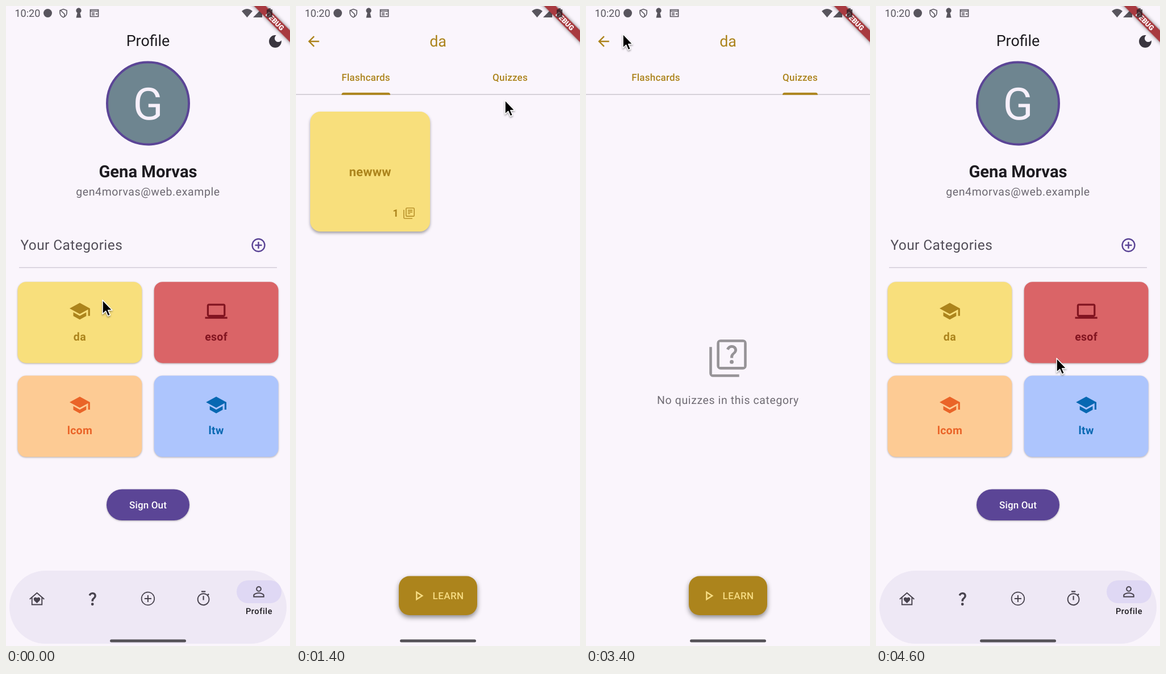
Write an HTML page that moves like this. It is 500 px wide and 1121 px high and loops after 4.7 s.

```html
<!DOCTYPE html>
<html lang="en">
<head>
<meta charset="utf-8">
<title>Study app</title>
<style>
  html, body { margin: 0; width: 100%; height: 100%; overflow: hidden; background: #faf5fc; }
  svg { display: block; width: 100%; height: 100%; }
  text { font-family: Roboto, sans-serif; text-rendering: geometricPrecision; white-space: pre; }
  .low { filter: drop-shadow(0 1.5px 1.5px rgba(0, 0, 0, .3)); }
  .mid { filter: drop-shadow(0 3px 2.5px rgba(0, 0, 0, .34)); }
  .high { filter: drop-shadow(0 4px 4px rgba(0, 0, 0, .44)); }
  .band { filter: drop-shadow(0 0 3px rgba(0, 0, 0, .5)); }
  .pointer { filter: drop-shadow(0 2px 1.5px rgba(0, 0, 0, .35)); }
</style>
</head>
<body>
<svg viewBox="0 0 500 1121" preserveAspectRatio="none">
  <g id="profile"></g>
  <g id="detail"></g>
  <g id="system"></g>
  <g id="cursor" class="pointer">
    <path d="M0 0V24.5L5.6 19.4 9.4 28 13.4 26.2 9.7 17.8H17Z" stroke="#fff" stroke-width="1.5" stroke-linejoin="round"/>
  </g>
</svg>
<script>
const BG = '#faf5fc', GOLD = '#ac841c', YELLOW = '#f8df7c', PURPLE = '#5b4596', INK = '#1d1b20', GREY = '#58555d';
const $ = id => document.getElementById(id);

const stack = 'M3.4 6H2v14a2 2 0 0 0 2 2h14v-1.4H3.4zM8 2h12a2 2 0 0 1 2 2v12a2 2 0 0 1-2 2H8a2 2 0 0 1-2-2V4a2 2 0 0 1 2-2zM7.4 3.4v13.2h13.2V3.4z';
const icons = {
  school: 'M5 13.18v4L12 21l7-3.82v-4L12 17zM12 3 1 9l11 6 9-4.91V17h2V9z',
  laptop: 'M20 18c1.1 0 2-.9 2-2V6c0-1.1-.9-2-2-2H4c-1.1 0-2 .9-2 2v10c0 1.1.9 2 2 2H0v2h24v-2zM4 6h16v10H4z',
  add: 'M13 7h-2v4H7v2h4v4h2v-4h4v-2h-4zM12 2a10 10 0 1 0 0 20 10 10 0 0 0 0-20zm0 18a8 8 0 1 1 0-16 8 8 0 0 1 0 16z',
  addThin: 'M12.8 7h-1.6v4.2H7v1.6h4.2V17h1.6v-4.2H17v-1.6h-4.2zM12 2a10 10 0 1 0 0 20 10 10 0 0 0 0-20zm0 18.6a8.6 8.6 0 1 1 0-17.2 8.6 8.6 0 0 1 0 17.2z',
  person: 'M12 5.7a2.3 2.3 0 1 1 0 4.6 2.3 2.3 0 0 1 0-4.6m0 9c2.97 0 6.3 1.46 6.3 2.3v1.3H5.7V17c0-.84 3.33-2.3 6.3-2.3M12 4a4 4 0 1 0 0 8 4 4 0 0 0 0-8zm0 9c-2.67 0-8 1.34-8 4v3h16v-3c0-2.66-5.33-4-8-4z',
  timer: 'M9 1h6v1.7H9zM11.1 8h1.8v6h-1.8zM19 7.4 20.4 6 19 4.6 17.6 6A9 9 0 1 0 19 7.4zM12 20.4a7.4 7.4 0 1 1 0-14.8 7.4 7.4 0 0 1 0 14.8z',
  question: 'M11.07 12.85c.77-1.39 2.25-2.21 3.11-3.44.91-1.29.4-3.7-2.18-3.7-1.69 0-2.52 1.28-2.87 2.34L6.54 6.96C7.25 4.83 9.18 3 12 3c2.35 0 3.96 1.07 4.78 2.41.7 1.15 1.11 3.3.03 4.9-1.2 1.77-2.35 2.31-2.97 3.45-.25.46-.35.76-.35 2.24H10.6c0-.78-.13-2.05.47-3.15zM14 20a2 2 0 1 1-4 0 2 2 0 0 1 4 0z',
  home: 'M12 2.8 1 12.3l1 1.2 2-1.7v9.7h16v-9.7l2 1.7 1-1.2zM12 4.9l6.4 5.5v9.5H5.6v-9.5zM12 18.6l-.8-.7c-2.5-2.2-4-3.6-4-5.3 0-1.5 1.1-2.5 2.5-2.5.9 0 1.700.4 2.300 1.100.6-.7 1.400-1.100 2.300-1.100 1.400 0 2.500 1 2.500 2.500 0 1.700-1.500 3.100-4 5.300z',
  moon: 'M12 3a9 9 0 1 0 9 9c0-.46-.04-.92-.1-1.36A5.4 5.4 0 1 1 13.36 3.1C12.92 3.04 12.46 3 12 3z',
  back: 'M20 11H7.83l5.59-5.59L12 4l-8 8 8 8 1.41-1.41L7.83 13H20z',
  play: 'M10 8.64 15.27 12 10 15.36zM8 5v14l11-7z',
  cards: stack + 'M10 9h8v1.4h-8zM10 12h4v1.4h-4zM10 6h8v1.4h-8z',
  quiz: stack + 'M13.51 10.16c.41-.73 1.18-1.16 1.63-1.8.48-.68.21-1.94-1.14-1.94-.88 0-1.32.67-1.5 1.23l-1.37-.57C11.51 5.96 12.52 5 14 5c1.23 0 2.08.56 2.51 1.26.37.6.58 1.73.01 2.57-.63.93-1.23 1.21-1.56 1.81-.13.24-.18.4-.18 1.18h-1.52c0-.41-.06-1.08.25-1.66zM15.04 13.95a1.05 1.05 0 1 1-2.1 0 1.05 1.05 0 0 1 2.1 0z'
};

const icon = (name, x, y, fill, scale = 1.216) =>
  `<path d="${icons[name]}" fill="${fill}" fill-rule="evenodd" transform="translate(${x} ${y}) scale(${scale}) translate(-12 -12)"/>`;
const rect = (x, y, w, h, r, fill, more = '') =>
  `<rect x="${x}" y="${y}" width="${w}" height="${h}" rx="${r}" fill="${fill}" ${more}/>`;
const label = (str, x, y, size, fill, weight = 400, spacing = 0, anchor = 'middle') =>
  `<text x="${x}" y="${y}" font-size="${size}" fill="${fill}" font-weight="${weight}" letter-spacing="${spacing}" text-anchor="${anchor}">${str}</text>`;

const category = (x, y, name, symbol, fill, tint) =>
  rect(x, y, 218.8, 142.3, 15, fill, 'class="low"') +
  rect(x, y, 218.8, 142.3, 15, '#bcbcbc', `id="press-${name}" opacity="0"`) +
  icon(symbol, x + 109.4, y + 51.4, tint, 1.63) +
  label(name, x + 109.4, y + 102.5, 19.5, tint, 700, .3);

$('profile').innerHTML =
  rect(-50, -50, 600, 1221, 0, BG) +
  label('Profile', 250, 70, 26.8, INK) +
  icon('moon', 474, 62, '#3a363f') +
  `<circle cx="250" cy="170.5" r="72" fill="#6e8590" stroke="${PURPLE}" stroke-width="4"/>` +
  label('G', 250, 199, 78, '#f7f0fa') +
  label('Gena Morvas', 250, 300, 29.2, INK, 700) +
  label('gen4morvas@web.example', 250, 332, 19.5, '#6c6871', 400, .6) +
  label('Your Categories', 25.5, 427, 24.4, '#524e58', 400, .45, 'start') +
  icon('add', 444.5, 419, PURPLE) +
  rect(23, 457.6, 454, 1.2, 0, '#cac4d0') +
  category(20.5, 483.2, 'da', 'school', YELLOW, GOLD) +
  category(260.7, 483.2, 'esof', 'laptop', '#da6467', '#821420') +
  category(20.5, 647.5, 'lcom', 'school', '#fdcb94', '#ea6428') +
  category(260.7, 647.5, 'ltw', 'school', '#adc5fd', '#0768b2') +
  rect(177, 846.5, 146, 54.5, 27.25, PURPLE, 'class="low"') +
  label('Sign Out', 250, 880, 17, '#fff', 500, .15) +
  rect(6, 989, 488, 128, 64, '#eee8f5') +
  rect(406, 1006, 79, 40, 20, '#dfd8f4') +
  ['home', 'question', 'addThin', 'timer'].map((n, i) => icon(n, 54.5 + i * 97.7, 1038, '#48434e')).join('') +
  icon('person', 445, 1026, '#48434e') +
  label('Profile', 445.5, 1064.5, 14.6, INK, 500, .6);

$('detail').innerHTML =
  rect(0, 0, 500, 1121, 0, BG) +
  icon('back', 31, 62, GOLD) +
  label('da', 250, 71, 26.8, GOLD) +
  rect(250, 97, 250, 57.5, 0, '#6e50e6', 'id="splash" opacity="0"') +
  label('Flashcards', 123, 131, 17, GOLD, 500, .2) +
  label('Quizzes', 377, 131, 17, GOLD, 500, .2) +
  rect(0, 154.3, 500, 1.2, 0, '#bfb9c3') +
  `<path id="indicator" fill="${GOLD}"/>` +
  '<g id="tabs">' +
  rect(25, 185, 211, 210, 18, YELLOW, 'class="mid"') +
  label('newww', 130.5, 298, 22, GOLD, 700, .3) +
  label('1', 175.5, 369, 18, GOLD, 700) +
  icon('cards', 199, 363, GOLD, .98) +
  icon('quiz', 750, 617, '#969397', 3.28) +
  label('No quizzes in this category', 750, 697, 19.5, '#6f6b73', 400, .6) +
  '</g>' +
  rect(181, 998.5, 138, 68.5, 19, GOLD, 'class="high"') +
  icon('play', 216, 1033, '#f6dc83') +
  label('LEARN', 268, 1039, 17, '#f6dc83', 500, .4);

$('system').innerHTML =
  label('10:20', 15.5, 18.7, 18, GREY, 400, 0, 'start') +
  `<circle cx="73.5" cy="12.5" r="7.5" fill="${GREY}"/>
   <path d="M101 5.5 107 7.8V12.5Q106.5 17.5 101 19.8 95.5 17.5 95 12.5V7.8ZM96 7.5 103 14V18.5" fill="none" stroke="${GREY}" stroke-width="1.6"/>
   <path d="M125.6 12A4.7 4.7 0 1 1 130.4 12L132.5 20.5H123.5Z" fill="${GREY}"/>
   <path d="M148.5 6.5H162.5V18.5H148.5ZM148.5 9H162.5M151 12.3H156M151 15.3H156M158 13.8H161" fill="none" stroke="${GREY}" stroke-width="1.7"/>
   <path d="M415 9Q424.5 1 434 9L424.5 20ZM451 4V20H435Z" fill="${GREY}"/>
   <g transform="translate(473.5 26.5) rotate(45)">
     <rect x="-60" y="-7.3" width="120" height="14.6" fill="#a83a40" class="band"/>
     ${label('DEBUG', 0, 4.4, 12.4, '#fff', 900)}
   </g>
   <path d="M459 6H462V4H466V6H469V20H459Z" fill="#241a20" opacity=".72"/>` +
  rect(183, 1109.5, 134, 5, 2.5, '#555258');

// Time in ms, then x and y of the pointer's tip.
const path = [
  [0, 170, 515], [400, 164, 512], [700, 164, 512], [1400, 368, 165], [2200, 385, 108],
  [3000, 385, 108], [3400, 65, 49], [3700, 33, 48], [4300, 33, 48], [4600, 318, 617]
];
const clamp = v => Math.min(1, Math.max(0, v));
const mix = (a, b, p) => a + (b - a) * p;
const smooth = p => p * p * (3 - 2 * p);

function pointerAt(t) {
  const i = Math.max(1, path.findIndex(k => k[0] >= t));
  const [a, b] = [path[i - 1], path[i]];
  const p = smooth((t - a[0]) / (b[0] - a[0]));
  return [mix(a[1], b[1], p), mix(a[2], b[2], p)];
}

// Page zoom: a short slow start, then a quick jump that settles.
function zoom(p) {
  const start = 1 / 6;
  return p < start ? .4 * (p / start) ** 3 : 1 - .6 * (1 - (p - start) / (1 - start)) ** 5;
}
const scaled = s => `translate(250 560.5) scale(${s}) translate(-250 -560.5)`;

const PUSH = 335, POP = 4235, SLIDE = 2570, DURATION = 300, LOOP = 4700, STEP = 100;

function draw(t) {
  const push = clamp((t - PUSH) / DURATION), pop = clamp((t - POP) / DURATION);
  const opening = zoom(push), closing = zoom(pop);

  $('profile').setAttribute('transform', scaled(pop ? mix(1.1, 1, closing) : mix(1, 1.05, opening)));
  $('detail').setAttribute('transform', scaled(pop ? mix(1, .9, closing) : mix(.85, 1, opening)));
  $('detail').setAttribute('opacity', pop ? 1 - clamp((pop - .0825) / .125) : clamp((push - .125) / .125));
  $('press-da').setAttribute('opacity', pop ? .3 * clamp((4500 - t) / 200) : .4 * clamp((t - 200) / 120));

  const slide = 1 - (1 - clamp((t - SLIDE) / DURATION)) ** 2.2;
  const left = mix(80.2, 346, slide), right = mix(166, 408, slide);
  $('indicator').setAttribute('d', `M${left} 155.8a3.6 4 0 0 1 3.6-4H${right - 3.6}a3.6 4 0 0 1 3.6 4z`);
  $('tabs').setAttribute('transform', `translate(${-500 * slide} 0)`);
  $('splash').setAttribute('opacity', t < 2500 ? 0 : Math.min(.025 + (t - 2500) / 2500, .07 * clamp((3000 - t) / 300)));

  $('cursor').setAttribute('transform', `translate(${pointerAt(t)})`);
}

const began = performance.now();
function tick() {
  const t = (performance.now() - began) % LOOP;
  draw(Math.floor(t / STEP) * STEP);
  requestAnimationFrame(tick);
}
tick();
</script>
</body>
</html>
```
